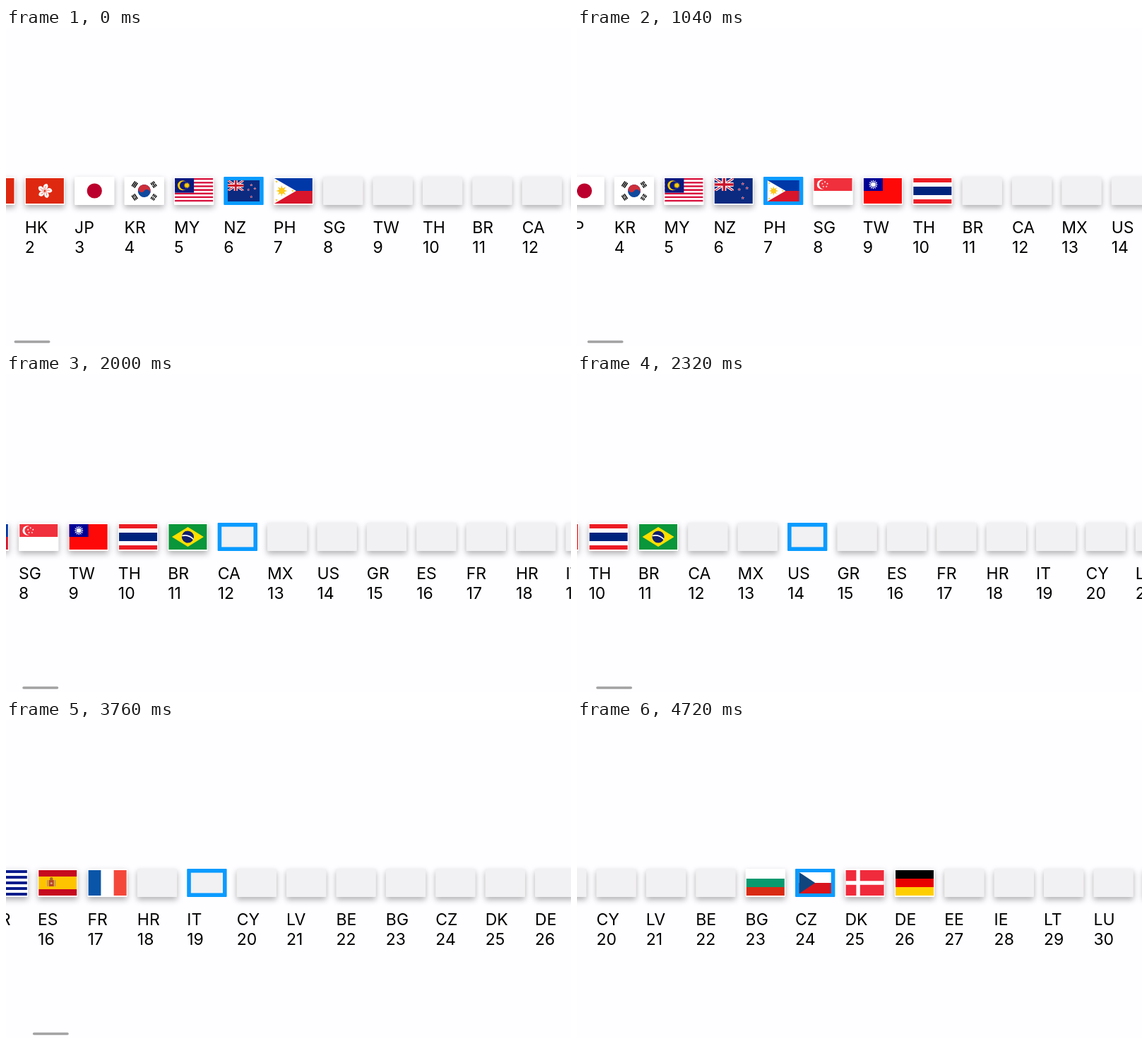
Write an HTML page that moves like this. It is 800 px wide and 451 px high and loops after 4840 ms.

```html
<!DOCTYPE html>
<html lang="en">
<head>
<meta charset="utf-8">
<title>Flag carousel</title>
<style>
  html, body { margin: 0; width: 100%; height: 100%; overflow: hidden; background: #fefdff; }
  #stage { display: block; width: 100vw; height: 100vh; }
  text { font: 400 23px Inter, "Liberation Sans", sans-serif; fill: #000; }
</style>
</head>
<body>
<svg id="stage" viewBox="0 0 800 451">
  <defs>
    <filter id="blur" x="-40%" y="-50%" width="180%" height="200%"><feGaussianBlur stdDeviation="4.5"/></filter>
  </defs>
  <g id="row"></g>
  <rect id="bar" y="443.2" width="51" height="3.5" rx="1.75" fill="#000" fill-opacity=".36"/>
</svg>
<script>
const LOOP = 4840, STEP = 40;
const PITCH = 70.4, CELL_W = 56.4, CELL_H = 40, TOP = 211;
const W = 54, H = 36;
const codes = 'CN HK JP KR MY NZ PH SG TW TH BR CA MX US GR ES FR HR IT CY LV BE BG CZ DK DE EE IE LT LU HU'.split(' ');

// Drawing helpers, all returning SVG markup
const rect = (x, y, w, h, fill) => `<rect x="${x}" y="${y}" width="${w}" height="${h}" fill="${fill}"/>`;
const disc = (x, y, r, fill) => `<circle cx="${x}" cy="${y}" r="${r}" fill="${fill}"/>`;
const poly = (points, fill) => `<polygon points="${points}" fill="${fill}"/>`;
const line = (d, stroke, width) => `<path d="${d}" fill="none" stroke="${stroke}" stroke-width="${width}"/>`;
const group = (transform, body) => `<g transform="${transform}">${body}</g>`;
const repeat = (n, draw) => Array.from({ length: n }, (_, i) => draw(i)).join('');
const base = fill => rect(0, 0, W, H, fill);
const rows = (...fills) => fills.map((f, i) => rect(0, i * H / fills.length, W, H / fills.length, f)).join('');
const cols = (...fills) => fills.map((f, i) => rect(i * W / fills.length, 0, W / fills.length, H, f)).join('');
const stripes = (n, a, b) => rows(...Array.from({ length: n }, (_, i) => i % 2 ? b : a));
const star = (x, y, r, fill, tips = 5, inner = .4) => poly(Array.from({ length: tips * 2 }, (_, i) => {
  const a = Math.PI * i / tips - Math.PI / 2, q = i % 2 ? r * inner : r;
  return `${(x + q * Math.cos(a)).toFixed(2)},${(y + q * Math.sin(a)).toFixed(2)}`;
}).join(' '), fill);

function trigram(angle, pattern) {
  const bars = [...pattern].map((kind, i) => {
    const x = (i - 1) * 2.2;
    return line(kind === '1' ? `M${x} -4.2V4.2` : `M${x} -4.2V-.5M${x} .5V4.2`, '#111', 1.5);
  });
  return group(`rotate(${angle}) translate(16.2 0)`, bars.join(''));
}

function unionJack() {
  const diagonals = 'M0 0L27 18M27 0L0 18', cross = 'M13.5 0V18M0 9H27';
  return `<svg width="27" height="18">${line(diagonals, '#fff', 3.6)}${line(diagonals, '#cc142b', 1.3)}` +
    `${line(cross, '#fff', 6)}${line(cross, '#cc142b', 3.4)}</svg>`;
}

const flags = {
  CN: () => base('#de2910'),
  HK: () => base('#de2910') + group('translate(27 18)', repeat(5, i => group(`rotate(${i * 72 + 12})`,
    '<path d="M0 -1C-5 -4 -4 -10 1 -10.5C4.500 -8 3.500 -4 0 -1" fill="#fff"/>' + line('M0 -2Q-1.500 -4 .3 -7', '#de2910', .6)))),
  JP: () => base('#fff') + disc(27, 18, 10.6, '#bc002d'),
  KR: () => base('#fff') + group('translate(27 18)',
    group('rotate(33.7)', disc(0, 0, 9, '#0f4a9e') +
      '<path d="M-9 0A9 9 0 0 1 9 0A4.500 4.500 0 0 0 0 0A4.500 4.500 0 0 1 -9 0" fill="#cd2e3a"/>') +
    trigram(213.7, '111') + trigram(326.3, '010') + trigram(146.3, '101') + trigram(33.7, '000')),
  MY: () => stripes(14, '#d8103c', '#fff') + rect(0, 0, 27, 20.6, '#0a1a80') +
    disc(11, 10.3, 7, '#fc0') + disc(13, 10.3, 6.1, '#0a1a80') + star(17, 10.3, 4.8, '#fc0', 14, .55),
  NZ: () => base('#0b2a80') + unionJack() +
    [[40, 8], [46, 14], [35, 16], [40, 28]].map(([x, y]) => star(x, y, 2.6, '#fff') + star(x, y, 1.8, '#d01030')).join(''),
  PH: () => rows('#0038a8', '#d8152b') + poly('0,0 31,18 0,36', '#fff') +
    star(10.5, 18, 8, '#fcc81c', 8, .45) + disc(10.5, 18, 4, '#fcc81c') +
    [[3, 5], [3, 31], [26, 18]].map(([x, y]) => star(x, y, 2, '#fcc81c')).join(''),
  SG: () => rows('#f0303c', '#fff') + disc(11, 9, 6.8, '#fff') + disc(13.6, 9, 6.3, '#f0303c') +
    repeat(5, i => { const a = (i * 72 - 90) * Math.PI / 180; return star(15.5 + 3.7 * Math.cos(a), 9 + 3.7 * Math.sin(a), 1.5, '#fff'); }),
  TW: () => base('#fe0808') + rect(0, 0, 27, 18, '#000095') + star(13.5, 9, 6.8, '#fff', 12, .6) +
    disc(13.5, 9, 4, '#000095') + disc(13.5, 9, 3.3, '#fff'),
  TH: () => rows('#ed1c24', '#fff', '#00247d', '#00247d', '#fff', '#ed1c24'),
  BR: () => base('#0a963a') + poly('27,4 49.5,18 27,32 4.5,18', '#fedf00') + disc(27, 18, 8.6, '#12206e') +
    line('M18.700 16.500Q28 14 35 21.500', '#fff', 1.5),
  MX: () => cols('#006847', '#fff', '#ce1126') + disc(27, 18, 4.2, '#b9a47c') +
    line('M23 18A4 4 0 0 0 31 18', '#5e8a4a', 1.1) + poly('25,15 29,14 30,18 27,20 24,18', '#6d4424'),
  US: () => stripes(13, '#e0283c', '#fff') + rect(0, 0, 23, 19.4, '#2c2f78') +
    repeat(9, r => repeat(r % 2 ? 5 : 6, c => disc(2 + c * 3.8 + (r % 2) * 1.9, 2 + r * 1.93, .75, '#fff'))),
  GR: () => stripes(9, '#0a1c8c', '#fff') + rect(0, 0, 20, 20, '#0a1c8c') + line('M10 0V20M0 10H20', '#fff', 4),
  ES: () => rows('#c60b1e', '#ffc400', '#ffc400', '#c60b1e') + rect(14.5, 14, 7, 9, '#b5442c') +
    rect(12, 14, 1.4, 9, '#b08c70') + rect(22.6, 14, 1.4, 9, '#b08c70') + disc(18, 12.4, 2.3, '#a8692a') + disc(18, 18.5, 1.6, '#d9a08c'),
  FR: () => cols('#0a55a8', '#fff', '#f4473a'),
  BG: () => rows('#fff', '#0a9a70', '#d92a14'),
  CZ: () => rows('#fff', '#d9141c') + poly('0,0 27,18 0,36', '#11457e'),
  DK: () => base('#f02b3c') + line('M17.500 0V36M0 18H54', '#fff', 5.4),
  DE: () => rows('#000', '#e80000', '#ffce00')
};

const loadTimes = { SG: 240, TW: 640, TH: 640, BR: 1160, MX: 2920, US: 2920, GR: 2920, ES: 2920, FR: 2920,
  BG: 4640, CZ: 4640, DK: 4720, DE: 4720 };

const easeOut = p => 1 - (1 - p) ** 2;
const glide = p => .62 * p + .38 * p * p * (3 - 2 * p);

// time, scroll offset, easing towards that offset
const scrollKeys = [
  [0, 114.1], [240, 188.8, easeOut],
  [960, 188.8], [1160, 251.4, easeOut],
  [1760, 251.4], [2320, 687.6, easeOut], [2480, 687, easeOut],
  [3440, 687], [4040, 1417.8, glide], [4080, 1417.8], [4240, 1380.6, easeOut], [LOOP, 1380.6]
];
// scroll bar: shown after, starts fading at
const barSpans = [[-1, 320], [960, 1240], [1760, 2640], [3440, 4320]];
const FADE = 200;

function scrollAt(t) {
  const i = scrollKeys.findIndex(key => key[0] > t);
  const [t0, s0] = scrollKeys[i - 1], [t1, s1, ease = p => p] = scrollKeys[i];
  return s0 + (s1 - s0) * ease((t - t0) / (t1 - t0));
}

function barOpacity(t) {
  const span = barSpans.find(([from, fade]) => t > from && t < fade + FADE);
  return span ? Math.min(1, 1 - (t - span[1]) / FADE) : 0;
}

const row = document.getElementById('row'), bar = document.getElementById('bar');
row.innerHTML = codes.map((code, i) => `<g>
  <rect class="shadow" x="0" y="${TOP + 4}" width="${CELL_W}" height="${CELL_H}" fill="#000" fill-opacity=".3" filter="url(#blur)"/>
  <rect class="card" y="${TOP}" width="${CELL_W}" height="${CELL_H}" rx="1"/>
  <rect class="blank" x="5.6" y="${TOP + 5.6}" width="${CELL_W - 11.2}" height="${CELL_H - 11.2}" fill="#f1f0f2"/>
  <g class="flag">${flags[code] ? flags[code]() : ''}</g>
  <text x="0" y="291">${code}</text><text x="0" y="319">${i + 1}</text></g>`).join('');

const cells = [...row.children].map((node, i) => {
  const part = name => node.querySelector('.' + name);
  const code = codes[i];
  return {
    node, index: i + 1, shadow: part('shadow'), card: part('card'), blank: part('blank'), flag: part('flag'),
    loadAt: flags[code] ? loadTimes[code] || 0 : Infinity
  };
});
const show = (node, on) => node.setAttribute('display', on ? 'inline' : 'none');

function render(t) {
  const scroll = scrollAt(t), selected = Math.round((scroll + 290) / PITCH);
  for (const cell of cells) {
    const x = cell.index * PITCH - scroll, visible = x > -90 && x < 830;
    show(cell.node, visible);
    if (!visible) continue;
    const active = cell.index === selected, loaded = t >= cell.loadAt;
    cell.node.setAttribute('transform', `translate(${x.toFixed(2)} 0)`);
    cell.card.setAttribute('fill', active ? '#0a9bff' : loaded ? '#fff' : '#f1f0f2');
    show(cell.shadow, !active);
    show(cell.blank, active && !loaded);
    show(cell.flag, loaded);
    cell.flag.setAttribute('transform', active
      ? `translate(5.7 ${TOP + 5}) scale(.8333)`
      : `translate(1.2 ${TOP + 2})`);
  }
  bar.setAttribute('x', (8.4 + scroll * .0272).toFixed(2));
  bar.setAttribute('opacity', barOpacity(t));
}

const start = performance.now();
function tick() {
  const t = (performance.now() - start) % LOOP;
  render(Math.floor(t / STEP) * STEP);
  requestAnimationFrame(tick);
}
tick();
</script>
</body>
</html>
```
